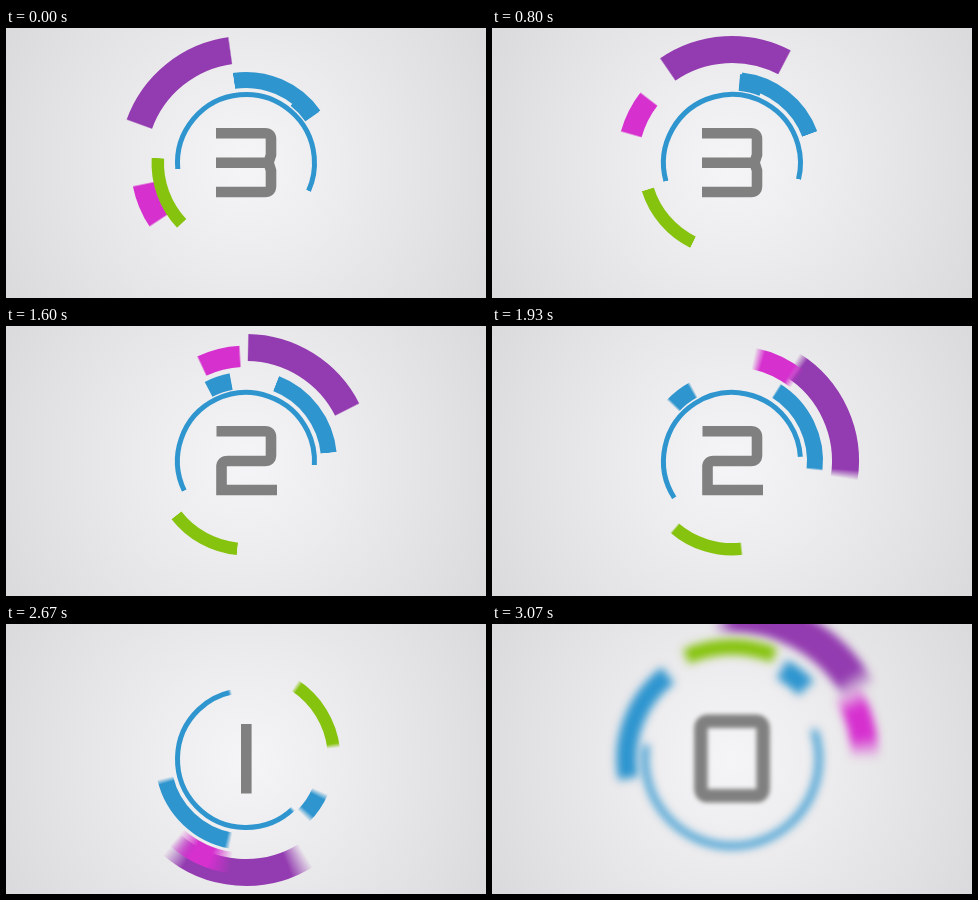
Recreate the animation shown at these times as an HTML page with a canvas. Size 480 px wide and 270 px high, loop 3.14 s.

```html
<!DOCTYPE html>
<html lang="en">
<head>
<meta charset="utf-8">
<title>Countdown</title>
<style>
  html, body { margin: 0; width: 100%; height: 100%; overflow: hidden; background: #e6e5e7; }
  canvas { display: block; width: 480px; height: 270px; }
</style>
</head>
<body>
<canvas id="stage" width="480" height="270"></canvas>
<script>
const ctx = document.getElementById('stage').getContext('2d');
const LOOP = 3140, CX = 240, CY = 135;
const SHUTTER = 1 / 60;
const RAD = Math.PI / 180;

// Every arc drifts at a steady rate, then gains extra turn through these times (s).
const TIMES = [1.7, 1.93, 2.27, 2.67, 3.07];
const BLUE = [46, 149, 207];

// from, span, rate: degrees and degrees per second; boost: extra degrees at TIMES
const arcs = [
  { rgb: [147, 59, 176], inner: 100, outer: 127, from: 200, span: 62, rate: 44.4, boost: [0, 18.8, 177, 465, 650] },
  { rgb: [214, 48, 207], inner: 94, outer: 115.5, from: 146.7, span: 21.6, rate: 61.5, boost: [0, 19, 194, 513, 718] },
  { rgb: [134, 195, 14], inner: 82, outer: 94.5, from: 136.8, span: 46.3, rate: -25.7, boost: [0, -3.3, -45, -123, -172] },
  { rgb: BLUE, inner: 75, outer: 91, from: 261.7, span: 63, rate: 18.5, boost: [0, 5.2, 56.5, 151, 211] },
  { rgb: BLUE, inner: 72.5, outer: 89.2, from: 308, span: 17, rate: -41, boost: [0, -5, -64, -173, -243] },
  { rgb: BLUE, inner: 66, outer: 71, from: 175, span: 209, rate: -12.9, boost: [0, -2.6, -32.8, -93, -155] }
];

const digits = [
  'M210 105.3H259Q265 105.3 265 111.3V127L262.5 134.7L265 142.5V158Q265 164 259 164H210M210 134.7H262.5',
  'M210.5 105.3H259Q265 105.3 265 111.3V129Q265 135 259 135H221.5Q215.5 135 215.5 141V164H271',
  'M240.3 100V169.5',
  'M221.5 105.3H258.5Q264.5 105.3 264.5 111.3V158Q264.5 164 258.5 164H221.5Q215.5 164 215.5 158V111.3Q215.5 105.3 221.5 105.3Z'
].map(d => new Path2D(d));

const backdrop = ctx.createRadialGradient(CX, CY, 0, CX, CY, 285);
backdrop.addColorStop(0, '#f5f4f6');
backdrop.addColorStop(0.35, '#ecebed');
backdrop.addColorStop(0.7, '#e2e1e3');
backdrop.addColorStop(1, '#d9d8da');

const slope = (v, i) => (v[i + 1] - v[i]) / (TIMES[i + 1] - TIMES[i]);

function tangent(v, i) {
  if (i === 0) return 0;
  if (i === TIMES.length - 1) return slope(v, i - 1);
  const a = TIMES[i] - TIMES[i - 1], b = TIMES[i + 1] - TIMES[i];
  return (b * slope(v, i - 1) + a * slope(v, i)) / (a + b);
}

// Cubic Hermite curve through the boost values
function boostAt(v, t) {
  if (t <= TIMES[0]) return 0;
  let i = 0;
  while (i < TIMES.length - 2 && t > TIMES[i + 1]) i++;
  const h = TIMES[i + 1] - TIMES[i], s = (t - TIMES[i]) / h;
  const s2 = s * s, s3 = s2 * s;
  return (2 * s3 - 3 * s2 + 1) * v[i] + (3 * s2 - 2 * s3) * v[i + 1] +
    h * ((s3 - 2 * s2 + s) * tangent(v, i) + (s3 - s2) * tangent(v, i + 1));
}

const angleAt = (arc, t) => arc.from + arc.rate * t + boostAt(arc.boost, t);

function drawArc(arc, t) {
  const start = angleAt(arc, t);
  const speed = (start - angleAt(arc, t - 0.002)) / 0.002;
  const smear = Math.max(0.4, Math.abs(speed) * SHUTTER);
  const a = (start - smear / 2) * RAD;
  const total = arc.span + smear;
  const solid = `rgb(${arc.rgb})`, clear = `rgba(${arc.rgb},0)`;
  const paint = ctx.createConicGradient(a % (2 * Math.PI), CX, CY);
  paint.addColorStop(0, clear);
  paint.addColorStop(smear / 360, solid);
  paint.addColorStop(arc.span / 360, solid);
  paint.addColorStop(total / 360, clear);
  ctx.strokeStyle = paint;
  ctx.lineWidth = arc.outer - arc.inner;
  ctx.beginPath();
  ctx.arc(CX, CY, (arc.inner + arc.outer) / 2, a, a + total * RAD);
  ctx.stroke();
}

const soften = px => { ctx.filter = px > 0 ? `blur(${px}px)` : 'none'; };

function draw(ms) {
  const t = ms / 1000;
  const push = Math.max(0, (t - 2.94) / 0.13) ** 2;
  const zoom = 1 + 0.27 * push;

  ctx.fillStyle = backdrop;
  ctx.fillRect(0, 0, 480, 270);

  ctx.save();
  ctx.translate(CX, CY);
  ctx.scale(zoom, zoom);
  ctx.translate(-CX, -CY);
  soften(4 * push);
  arcs.forEach(arc => drawArc(arc, t));
  soften(2.2 * push);
  ctx.strokeStyle = '#808080';
  ctx.lineWidth = 10.6;
  ctx.stroke(digits[Math.min(3, Math.floor(t))]);
  ctx.restore();
}

// Fifteen pictures a second, on a 10 ms grid
function snap(ms) {
  const rest = ms % 200;
  return ms - rest + (rest >= 130 ? 130 : rest >= 70 ? 70 : 0);
}

const begin = performance.now();
function tick() {
  draw(snap((performance.now() - begin) % LOOP));
  requestAnimationFrame(tick);
}
tick();
</script>
</body>
</html>
```
